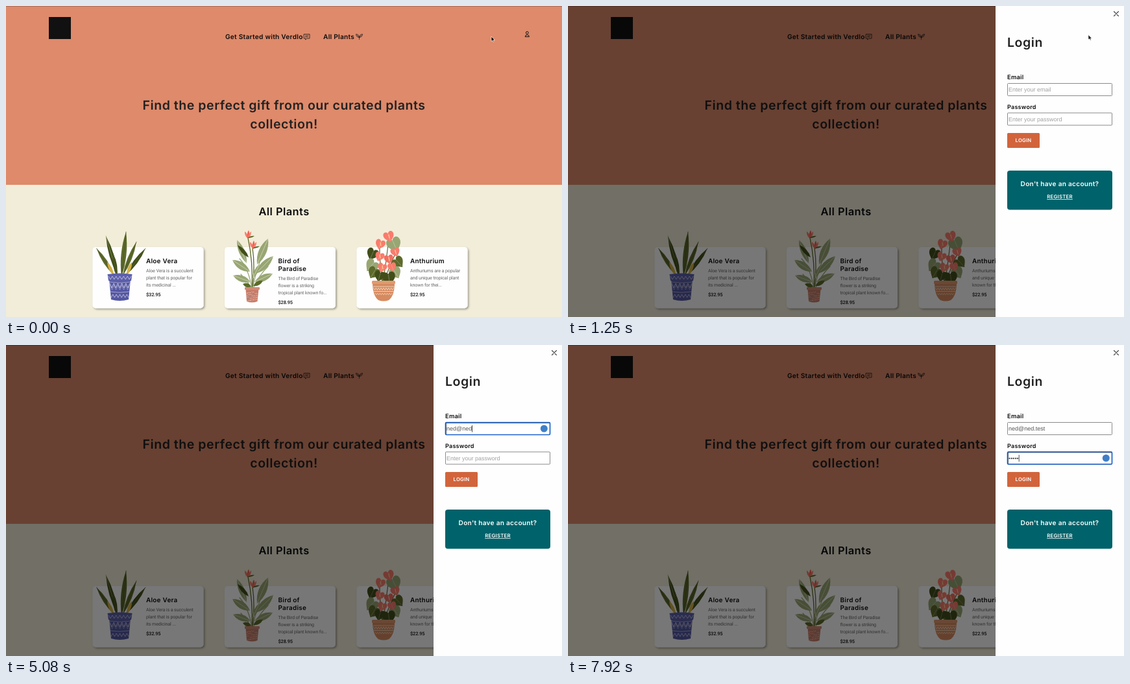
Animation, 857 px wide and 480 px high, one loop 8 s. Source, as an HTML page:

```html
<!DOCTYPE html>
<html lang="en">
<head>
<meta charset="utf-8">
<title>Plant shop login</title>
<style>
  html, body { margin: 0; width: 100%; height: 100%; overflow: hidden; background: #f2edd9; }
  svg { display: block; width: 857px; height: 480px; }
  text { text-rendering: geometricPrecision; white-space: pre; }
  .title { font-family: Montserrat, Inter, sans-serif; font-weight: 600; letter-spacing: .028em; }
  .body { font-family: Roboto, sans-serif; letter-spacing: -.015em; }
  .field { font-family: "Liberation Sans", Arial, sans-serif; font-size: 9px; }
</style>
</head>
<body>
<svg id="stage" viewBox="0 0 857 480" xmlns="http://www.w3.org/2000/svg"></svg>
<script>
const LOOP = 8000;
const DARK = '#414e1a', OLIVE = '#5d6a2b', SAGE = '#98a673', CORAL = '#fa7b6c', CLAY = '#d78a5f';

// Drawing helpers, each returning SVG markup
const rect = (x, y, w, h, fill, r = 0, more = '') =>
  `<rect x="${x}" y="${y}" width="${w}" height="${h}" rx="${r}" fill="${fill}" ${more}/>`;
const fill = (d, color) => `<path d="${d}" fill="${color}"/>`;
const line = (d, color, width = 1) =>
  `<path d="${d}" fill="none" stroke="${color}" stroke-width="${width}" stroke-linecap="round" stroke-linejoin="round"/>`;
const text = (x, y, str, size, color = '#0c0c0c', kind = 'title', more = '') =>
  `<text x="${x}" y="${y}" class="${kind}" font-size="${size}" fill="${color}" ${more}>${str}</text>`;
const centered = (x, y, str, size, color, more = '') =>
  text(x, y, str, size, color, 'title', `text-anchor="middle" ${more}`);

// A pointed leaf from base to tip, with an optional midrib
function leaf(x, y, tipX, tipY, width, color, rib) {
  const mx = (x + tipX) / 2, my = (y + tipY) / 2, len = Math.hypot(tipX - x, tipY - y);
  const nx = (y - tipY) / len * width, ny = (tipX - x) / len * width;
  return fill(`M${x} ${y}Q${mx + nx} ${my + ny} ${tipX} ${tipY}Q${mx - nx} ${my - ny} ${x} ${y}`, color)
    + (rib ? line(`M${x} ${y}L${tipX} ${tipY}`, rib, .6) : '');
}

// A heart-shaped leaf or flower
const heart = (x, y, size, angle, color, rib = '#ffffff55') =>
  `<g transform="translate(${x} ${y}) rotate(${angle}) scale(${size})">`
  + fill('M0-.5C.3-1.1 1.1-.9 1-.1C.9.5.3.8 0 1.2C-.3.8-.9.5-1-.1C-1.1-.9-.3-1.1 0-.5', color)
  + line('M0-.4L0 .9', rib, .08) + '</g>';

function zigzag(x1, x2, y, height, count) {
  let d = `M${x1} ${y}`;
  for (let i = 1; i <= count; i++) d += `L${x1 + (x2 - x1) * i / count} ${y + (i % 2) * height}`;
  return d;
}

const aloe = () =>
  leaf(167, 416, 139.5, 374, 6.5, OLIVE, DARK) + leaf(184, 416, 215, 374, 6.5, DARK, OLIVE)
  + leaf(172, 416, 154, 355, 7, DARK, SAGE) + leaf(180, 416, 201, 364, 6.5, OLIVE, DARK)
  + leaf(178, 418, 185, 348.5, 8, OLIVE, DARK) + leaf(171, 418, 165, 382, 6, DARK, OLIVE)
  + leaf(166, 416, 156, 395, 5, '#d3b144') + leaf(186, 416, 194, 395, 5, '#d3b144')
  + fill('M159 422H192L189 453Q175 457 162 453Z', '#5457a2')
  + fill('M156.5 414Q175.5 411 194.5 414L193 424Q175 426.5 158 424Z', '#5c5fab')
  + line(zigzag(158, 193, 417, 5, 12), '#dedced', .7)
  + line(zigzag(160, 191, 428, 7, 10), '#dedced', .8)
  + line(zigzag(160.5, 190.5, 431, 7, 10), '#c3c3e0', .5)
  + line('M159.5 426Q175 428.5 192 426M160.5 441Q175 443.5 190 441', '#dedced', .6)
  + line(zigzag(162, 189, 450, -5, 10), '#dedced', .7);

const bloom = (x, y) =>
  leaf(x, y + 8, x - 5, y - 3, 3.5, CORAL) + leaf(x, y + 8, x + 1, y - 5, 3.5, '#ef6252')
  + leaf(x, y + 8, x + 5, y - 3, 3, CORAL) + leaf(x - 1, y + 7, x + 10, y + 4, 2.5, OLIVE);

const birdOfParadise = () => {
  let specks = '';
  for (let i = 0; i < 44; i++) {
    const x = 371 + (i * 7.3) % 17, y = 440 + (i * 4.7) % 15;
    specks += rect(x, y, 1, .9, i % 4 ? '#f3dccf' : '#7d8a9a');
  }
  return line('M379 436Q381 395 373 358M380 436Q384 400 380 374', OLIVE, 1.3)
    + line('M379 436Q374 405 360 390M380 436Q386 405 398 378M379 436Q372 425 362 414M381 436Q390 415 404 402', SAGE, 1.2)
    + leaf(371, 397, 356, 361, 9, SAGE, '#e6e8d0') + leaf(387, 399, 404, 359, 12, SAGE, '#e6e8d0')
    + leaf(376, 410, 349, 392, 11, SAGE, '#e6e8d0') + leaf(385, 413, 412, 386, 11, SAGE, '#e6e8d0')
    + leaf(377, 426, 350, 416, 10, SAGE, '#e6e8d0') + leaf(383, 426, 411, 413, 10, SAGE, '#e6e8d0')
    + leaf(374, 388, 357, 369, 6, DARK) + leaf(381, 432, 396, 424, 6, OLIVE)
    + leaf(378, 433, 365, 429, 6, OLIVE) + leaf(380, 421, 391, 398, 6, SAGE, '#e6e8d0')
    + bloom(373, 351) + bloom(381, 367)
    + fill('M369.5 437H389.5L387.5 456Q379 459 371 456Z', '#c97d69')
    + rect(368, 434, 23, 4, '#d08a74', 1) + specks;
};

const anthurium = () =>
  line('M581 426Q587 390 590 357M581 426Q575 395 576 369M582 426Q592 400 602 378M581 426Q570 405 562 399M582 426Q598 412 606 394', OLIVE, 1.2)
  + heart(598, 367, 11, -24, SAGE) + heart(565, 382, 9, 24, DARK) + heart(604, 395, 9, -42, OLIVE)
  + heart(564, 400, 10, 40, SAGE) + heart(567, 411, 9, 30, OLIVE) + heart(600, 411, 9, -30, SAGE)
  + heart(590, 419, 10, -8, DARK) + heart(576, 416, 8, 15, DARK)
  + heart(590, 355, 8, -18, CORAL) + heart(577, 367, 7.5, 18, CORAL) + heart(600, 379, 7, -22, CORAL)
  + heart(576, 386, 7, 20, CORAL) + heart(590, 390, 7, -10, '#f06f60') + heart(580, 403, 7, 20, CORAL)
  + heart(595, 402, 6.5, -18, CORAL)
  + [[590, 355], [577, 367], [600, 379], [576, 386], [590, 390], [580, 403]]
      .map(([x, y]) => line(`M${x} ${y - 2}l1 5`, '#f8d48d', 1.2)).join('')
  + fill('M565 427H599Q599 447 590 454Q582 457 574 454Q565 447 565 427', CLAY)
  + rect(564, 424, 36, 5, '#e09a70', 1.5)
  + line('M566 433H598M567 440.5H597', '#f6e3cb', .8)
  + line(zigzag(566.5, 597.5, 435, 3.5, 16), '#f6e3cb', .8)
  + line(zigzag(569, 595, 443, 3, 14), '#f6e3cb', .6);

function card(x, names, lines, price, plant) {
  const left = x + 82.5, shift = (names.length - 1) * 12;
  return rect(x, 372, 171, 94.5, '#fefefe', 5, 'filter="url(#shadow)"')
    + names.map((s, i) => text(left, 396.5 + 12 * i, s, 9.9)).join('')
    + lines.map((s, i) => text(left, 411 + shift + 11 * i, s, 7.1, '#666', 'body')).join('')
    + text(left, 448.3 + shift, price, 7.4, '#151515', 'body', 'font-weight="500"')
    + plant();
}

const page = () =>
  rect(0, 0, 857, 276, '#de8a6b') + rect(0, 276, 857, 204, '#f2edd9')
  + rect(0, 0, 857, .8, '#00000048')
  + rect(66, 17, 34, 34, '#111')
  + text(338, 51, 'Get Started with Verdlo', 10.1)
  + line('M459.5 43.5H468V50H464L461.5 52V50H459.5ZM461.5 45.8H466M461.5 47.8H465', '#1a1a1a', .8)
  + text(489, 51, 'All Plants', 10.1)
  + line('M544.5 51.5V47.5M544.5 48.5Q540 48.5 539.5 43.5Q544 43.5 544.5 48.5Q545 43.5 549.5 43.5Q549 48.5 544.5 48.5M541 45L544 48M548 45L545 48', '#1a1a1a', .75)
  + '<circle cx="803.3" cy="41.3" r="1.9" fill="none" stroke="#111"/>'
  + line('M800.2 47Q800.2 44.6 803.3 44.6Q806.4 44.6 806.4 47Z', '#111', 1)
  + centered(428.5, 160, 'Find the perfect gift from our curated plants', 19.5, '#212121')
  + centered(428.5, 188.5, 'collection!', 19.5, '#212121')
  + centered(428.5, 323, 'All Plants', 16.4)
  + card(133.5, ['Aloe Vera'], ['Aloe Vera is a succulent', 'plant that is popular for', 'its medicinal ...'], '$32.95', aloe)
  + card(337, ['Bird of', 'Paradise'], ['The Bird of Paradise', 'flower is a striking', 'tropical plant known fo...'], '$28.95', birdOfParadise)
  + card(540.5, ['Anthurium'], ['Anthuriums are a popular', 'and unique tropical plant', 'known for thei...'], '$22.95', anthurium);

const field = (id, y) =>
  rect(677.5, y, 161, 19, '#fff', 1, 'stroke="#8a8a8a"')
  + `<g id="${id}Focus">${rect(677.5, y, 161, 19, 'none', 1.5, 'stroke="#1c62c9" stroke-width="1.7"')}`
  + line(`M678.5 ${y + 18}V${y + 1}H837.5`, '#1b2c48', .6)
  + `<circle cx="829.3" cy="${y + 9.5}" r="5.5" fill="#3f7fc6"/></g>`
  + `<text id="${id}" class="field" x="679" y="${y + 12.7}"></text>`
  + rect(0, y + 4.5, .8, 10.5, '#222', 0, `id="${id}Caret"`);

const panel = () =>
  rect(659, 0, 199, 480, '#fefefe')
  + line('M841.5 8.5L848.5 15.5M848.5 8.5L841.5 15.5', '#444', 1.1)
  + text(677, 63, 'Login', 19.5, '#212121')
  + text(677, 113, 'Email', 9.3) + field('email', 119.5)
  + text(677, 158.5, 'Password', 9) + field('password', 165)
  + rect(677, 196, 50, 23, '#d2643c', 1.5) + centered(702, 210.2, 'LOGIN', 7.7, '#fff')
  + rect(677, 254, 162, 60.5, '#00626a', 4)
  + centered(758, 278, "Don't have an account?", 10.1, '#fff')
  + centered(758, 297, 'REGISTER', 7.8, '#fff', 'text-decoration="underline"');

document.getElementById('stage').innerHTML =
  `<defs><filter id="shadow" x="-10%" y="-10%" width="120%" height="130%">
    <feDropShadow dx="1.8" dy="1.8" stdDeviation="1.5" flood-color="#000" flood-opacity=".35"/></filter></defs>`
  + page() + rect(0, 0, 857, 480, '#000', 0, 'id="shade"')
  + `<g id="panel">${panel()}</g>`
  + '<path id="pointer" stroke="#fff" stroke-width=".7" stroke-linejoin="round"/>';

const el = id => document.getElementById(id);
const show = (id, on) => el(id).setAttribute('visibility', on ? 'visible' : 'hidden');
const clamp = v => Math.min(1, Math.max(0, v));

const ADDRESS = 'ned@ned.test';
const ADDRESS_KEYS = [3230, 3390, 3540, 4150, 4620, 4800, 4970, 5320, 5480, 5640, 5760, 5880];
const PASSWORD_KEYS = [0, 1, 2, 3, 4].map(i => 7540 + 80 * i);
const EMAIL_FOCUS = 2720, PASSWORD_FOCUS = 6500;
const POINTER_PATH = [[80, 748, 47], [760, 802, 44.5], [1900, 802, 44.5], [2550, 761, 128],
  [5950, 761, 128], [6200, 761, 152.5], [6300, 761, 152.5], [6450, 761, 173]];
const ARROW = 'M0 0V7.5L1.8 6L3 8.6L4.3 8L3.1 5.5H5.4Z';
const IBEAM = 'M-2-5H2V-4H.5V4H2V5H-2V4H-.5V-4H-2Z';

function pointerAt(t) {
  const next = POINTER_PATH.findIndex(p => p[0] > t);
  if (next === 0) return POINTER_PATH[0].slice(1);
  if (next < 0) return POINTER_PATH[POINTER_PATH.length - 1].slice(1);
  const [t0, x0, y0] = POINTER_PATH[next - 1], [t1, x1, y1] = POINTER_PATH[next];
  const p = (t - t0) / (t1 - t0), e = p * p * (3 - 2 * p);
  return [x0 + (x1 - x0) * e, y0 + (y1 - y0) * e];
}

function setField(id, value, placeholder, focused) {
  const node = el(id);
  node.textContent = value || placeholder;
  node.setAttribute('fill', value ? '#555' : '#a0a0a0');
  show(id + 'Focus', focused);
  show(id + 'Caret', focused);
  el(id + 'Caret').setAttribute('x', 679 + (value ? node.getComputedTextLength() : 0));
}

function draw(t) {
  // The panel eases out while the page dims with an ease-in
  const p = clamp((t - 895) / 330);
  el('panel').setAttribute('transform', `translate(${198 * (1 - p) ** 2} 0)`);
  el('shade').setAttribute('opacity', .53 * p * p);

  const typed = keys => keys.filter(k => k <= t).length;
  setField('email', ADDRESS.slice(0, typed(ADDRESS_KEYS)), 'Enter your email', t >= EMAIL_FOCUS && t < PASSWORD_FOCUS);
  setField('password', '•'.repeat(typed(PASSWORD_KEYS)), 'Enter your password', t >= PASSWORD_FOCUS);

  const [x, y] = pointerAt(t);
  const overField = x < 839 && p === 1 && ((y > 119 && y < 139) || (y > 165 && y < 184));
  el('pointer').setAttribute('d', overField ? IBEAM : ARROW);
  el('pointer').setAttribute('transform', `translate(${x} ${y})`);
  show('pointer', t < ADDRESS_KEYS[0] || (t > 6000 && t < PASSWORD_KEYS[0]));
}

function tick() {
  draw(performance.now() % LOOP);
  requestAnimationFrame(tick);
}
tick();
</script>
</body>
</html>
```
